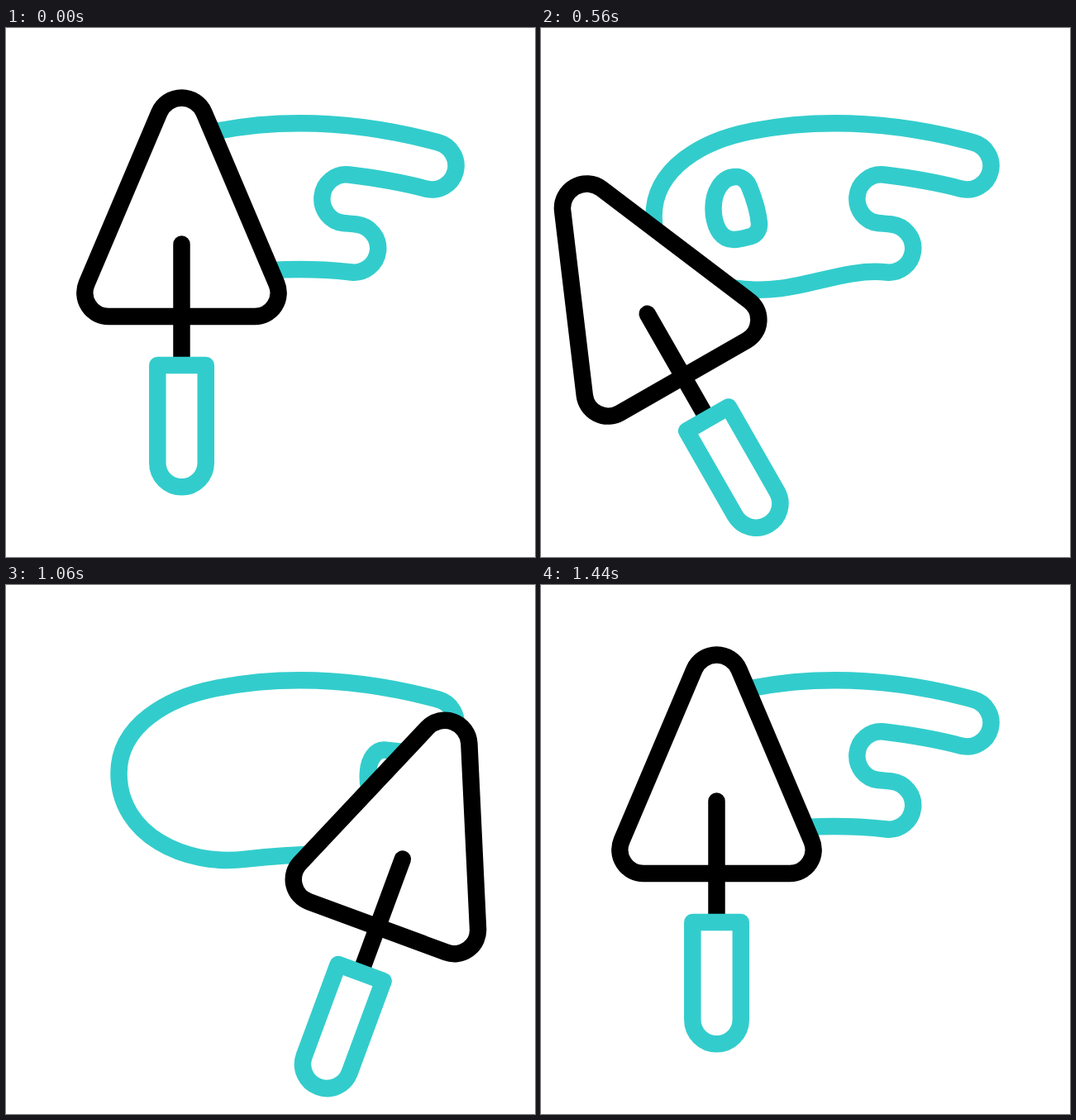
An HTML page for the animation above (2400 ms loop, 640 by 640 pixels).

```html
<!DOCTYPE html>
<html lang="en">
<head>
<meta charset="utf-8">
<title>Trowel</title>
<style>
html, body { margin: 0; width: 100%; height: 100%; overflow: hidden; background: #fff; }
svg { display: block; width: 100%; height: 100%; }
path { stroke-width: 20.5; stroke-linejoin: round; }
.teal { stroke: #33cccc; }
.black { stroke: #000; }
</style>
</head>
<body>
<svg viewBox="0 0 640 640" fill="none">
  <path id="cement" class="teal"/>
  <path id="hole" class="teal"/>
  <g id="trowel">
    <path class="black" fill="#fff" d="M124 349H301A28.6 28.6 0 0 0 327.3 309.1L239.6 102.4A29.5 29.5 0 0 0 185.4 102.4L97.7 309.1A28.6 28.6 0 0 0 124 349Z"/>
    <path class="black" stroke-linecap="round" d="M212.5 261.5V400"/>
    <path class="teal" fill="#fff" d="M183.3 408H241.8V526A29.25 29.25 0 0 1 183.3 526Z"/>
  </g>
</svg>
<script>
const LOOP = 2400, STEP = 20;
const SPREAD = 560, MERGED = 1160, END = 1440;
const $ = id => document.getElementById(id);
const cement = $('cement'), hole = $('hole'), trowel = $('trowel');

// Key poses of the trowel: time, x and y of the handle's top, angle
const poses = [
  [0, 212.5, 408, 0],
  [240, 196, 434, -12],
  [SPREAD, 201.5, 473, -29.8],
  [720, 278, 473, -11.8],
  [880, 405, 492, 19.4],
  [1040, 432, 474, 20.5],
  [1200, 335.5, 413.6, 12.4],
  [1320, 272, 403, 6.2],
  [END, 212.5, 408, 0]
];

// Nodes: x, y, heading in degrees, then the shift that merges the two arms
const outline = [
  [254, 125, -11],
  [523, 138.5, 15],
  [543.5, 174, 105],
  [508, 194.5, 195, -19, 10],
  [415, 177.5, 187, 48, 24],
  [382.5, 204, 95, 60, 23],
  [408, 236, 6, 43, 17],
  [424, 237.5, 7, 34, 17],
  [450, 270, 97, 18, 6],
  [418, 295.5, 186, 22, 36],
  [290, 315, 173, 0, 18],
  [136.5, 228, 270]
];
const BOTTOM = 10, LEFT = 11;
const gap = [
  [236, 180, 180],
  [208.5, 218, 90],
  [233, 256, 0],
  [254, 252, -17],
  [264, 236, -95],
  [252, 192, -112]
];

const smooth = (from, to, t) => {
  const u = Math.min(1, Math.max(0, (t - from) / (to - from)));
  return u * u * (3 - 2 * u);
};

// Closed curve that joins nodes with arc-like pieces along their headings
function curve(nodes) {
  const rad = Math.PI / 180;
  let d = 'M' + nodes[0].slice(0, 2);
  nodes.forEach(([x, y, a], i) => {
    const [x2, y2, b] = nodes[(i + 1) % nodes.length];
    const turn = ((b - a) % 360 + 540) % 360 - 180;
    const r = Math.hypot(x2 - x, y2 - y) / (3 * Math.cos(turn * rad / 4) ** 2);
    d += 'C' + [
      x + r * Math.cos(a * rad), y + r * Math.sin(a * rad),
      x2 - r * Math.cos(b * rad), y2 - r * Math.sin(b * rad), x2, y2
    ].map(v => v.toFixed(2));
  });
  return d + 'Z';
}

// Smooth value through the key poses that rests where it turns back
function glide(t, c) {
  const last = poses.length - 2;
  const rate = j => {
    const a = poses[j], b = poses[j + 1];
    return (b[c] - a[c]) / (b[0] - a[0]);
  };
  const slope = j => {
    const p = rate(Math.max(0, j - 1)), q = rate(Math.min(last, j));
    return p * q > 0 ? 2 * p * q / (p + q) : 0;
  };
  let i = 0;
  while (i < last && t >= poses[i + 1][0]) i++;
  const a = poses[i], b = poses[i + 1];
  const h = b[0] - a[0], u = (t - a[0]) / h, v = 1 - u;
  return v * v * (1 + 2 * u) * a[c] + u * u * (3 - 2 * u) * b[c]
    + h * u * v * (v * slope(i) - u * slope(i + 1));
}

function drawCement(t) {
  const back = smooth(MERGED, END, t);
  const merge = smooth(SPREAD, MERGED, t) - back;
  const open = Math.max(0, 1 - t / SPREAD);
  const tuck = open + back;
  const nodes = outline.map(([x, y, a, dx = 0, dy = 0]) => [x + dx * merge, y + dy * merge, a]);
  nodes[BOTTOM][1] -= 19 * tuck;
  nodes[LEFT][0] += 9.5 * tuck;
  nodes[LEFT][1] -= 6 * tuck;
  cement.setAttribute('d', curve(nodes));

  hole.setAttribute('transform', `translate(${11 * open} ${-25.6 * open}) scale(1 ${1 + 0.1 * open})`);
  hole.style.display = t < 720 ? '' : 'none';
}

function draw(time) {
  const now = Math.floor(time % LOOP / STEP) * STEP;
  const t = now < END ? now : 0;
  const [x, y, angle] = [1, 2, 3].map(c => glide(t, c));
  trowel.setAttribute('transform', `translate(${x} ${y}) rotate(${angle}) translate(-212.5 -408)`);
  drawCement(t);
}

hole.setAttribute('d', curve(gap));
const begin = performance.now();
function tick() {
  draw(performance.now() - begin);
  requestAnimationFrame(tick);
}
tick();
</script>
</body>
</html>
```
